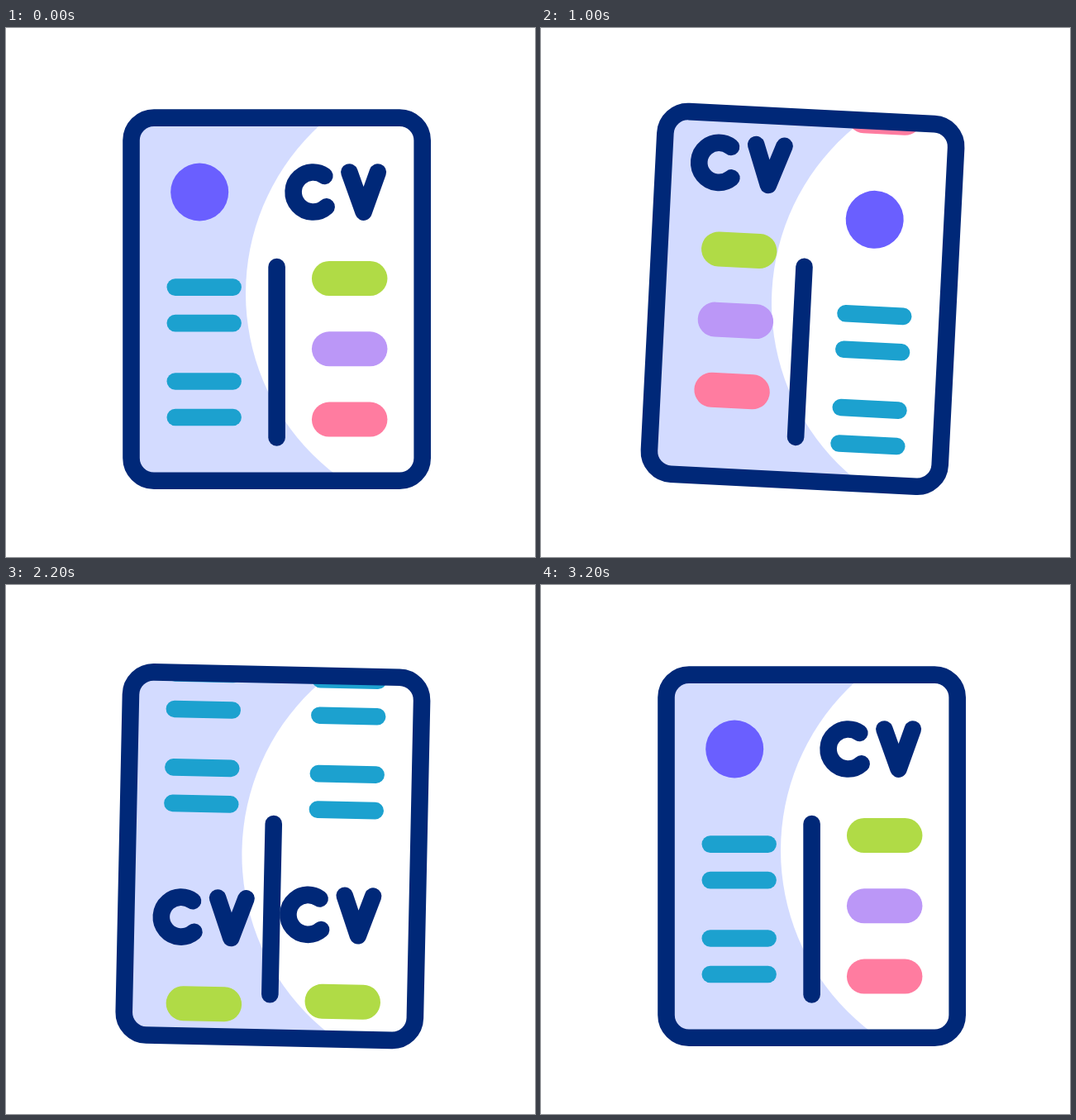
Write an HTML page with a canvas that moves like this. It is 640 by 640 pixels and loops after 3220 ms.

```html
<!DOCTYPE html>
<html lang="en">
<head>
<meta charset="utf-8">
<title>CV</title>
<style>
html, body { margin: 0; width: 100%; height: 100%; overflow: hidden; background: #fff; }
canvas { display: block; width: 640px; height: 640px; }
</style>
</head>
<body>
<canvas id="stage"></canvas>
<script>
const LOOP = 3220;
const NAVY = '#002878', LILAC = '#d3dbff', VIOLET = '#6a5fff', TEAL = '#1ca1cf';
const PILLS = ['#b0db46', '#bb97f7', '#ff7ca0'];
const PIVOT = { x: 327.6, y: 109 };
const TILT = [0, 4, -3, 2, 0];   // degrees, one key every 800 ms
const LEFT_STEP = 410, RIGHT_STEP = 400;

const canvas = document.getElementById('stage');
const ctx = canvas.getContext('2d');
const ratio = window.devicePixelRatio || 1;
canvas.width = canvas.height = 640 * ratio;

const ease = u => {
  u = Math.min(1, Math.max(0, u));
  return u * u * (3 - 2 * u);
};

function tilt(t) {
  const k = Math.min(3, Math.floor(t / 800));
  return TILT[k] + (TILT[k + 1] - TILT[k]) * ease(t / 800 - k);
}

function disc(x, y, r, color) {
  ctx.fillStyle = color;
  ctx.beginPath();
  ctx.arc(x, y, r, 0, Math.PI * 2);
  ctx.fill();
}

function bar(x, y, w, h, color) {
  ctx.fillStyle = color;
  ctx.beginPath();
  ctx.roundRect(x - w / 2, y - h / 2, w, h, Math.min(w, h) / 2);
  ctx.fill();
}

function framePath() {
  ctx.beginPath();
  ctx.roundRect(151.5, 108.6, 352.2, 439.2, 27.5);
}

function profile(dx, dy) {
  disc(234.2 + dx, 198.5 + dy, 35, VIOLET);
  for (const y of [313.6, 357.1, 427.5, 471]) bar(239.7 + dx, y + dy, 90.4, 20.6, TEAL);
}

function skills(dx, dy) {
  const x = 371.6 + dx * 153.5, y = 198.5 + dy;
  const rad = Math.PI / 180;
  ctx.strokeStyle = NAVY;
  ctx.beginPath();
  ctx.arc(x, y, 24, 48 * rad, 305 * rad);
  ctx.moveTo(x + 43.8, y - 24);
  ctx.lineTo(x + 61, y + 24.1);
  ctx.lineTo(x + 78.2, y - 24);
  ctx.stroke();
  PILLS.forEach((c, i) => bar(415.7 + dx * 167.8, 303 + i * 85.3 + dy, 91.5, 42, c));
}

function draw(t) {
  const first = ease(t / 1200), second = ease((t - 1600) / 1200);

  ctx.setTransform(ratio, 0, 0, ratio, 0, 0);
  ctx.fillStyle = '#fff';
  ctx.fillRect(0, 0, 640, 640);
  ctx.lineWidth = 20.6;
  ctx.lineCap = ctx.lineJoin = 'round';

  ctx.translate(PIVOT.x, PIVOT.y);
  ctx.rotate(tilt(t) * Math.PI / 180);
  ctx.translate(-PIVOT.x, -PIVOT.y);

  ctx.save();
  framePath();
  ctx.clip();
  ctx.fillStyle = LILAC;
  ctx.fillRect(140, 98, 375, 460);
  disc(565.5, 321, 275.5, '#fff');

  // left column rolls down, right column rolls up
  if (t < 1600) {
    profile(0, LEFT_STEP * first);
    skills(-1, LEFT_STEP * (first - 1));
    skills(0, -RIGHT_STEP * first);
    profile(175.6, RIGHT_STEP * (1 - first));
  } else {
    skills(-1, LEFT_STEP * second);
    profile(0, LEFT_STEP * (second - 1));
    profile(175.6, -RIGHT_STEP * second);
    skills(0, RIGHT_STEP * (1 - second));
  }
  ctx.restore();

  bar(327.6, 392.2, 20.6, 227, NAVY);
  ctx.strokeStyle = NAVY;
  framePath();
  ctx.stroke();
}

const start = performance.now();
function tick() {
  draw(Math.min(3200, (performance.now() - start) % LOOP));
  requestAnimationFrame(tick);
}
tick();
</script>
</body>
</html>
```
